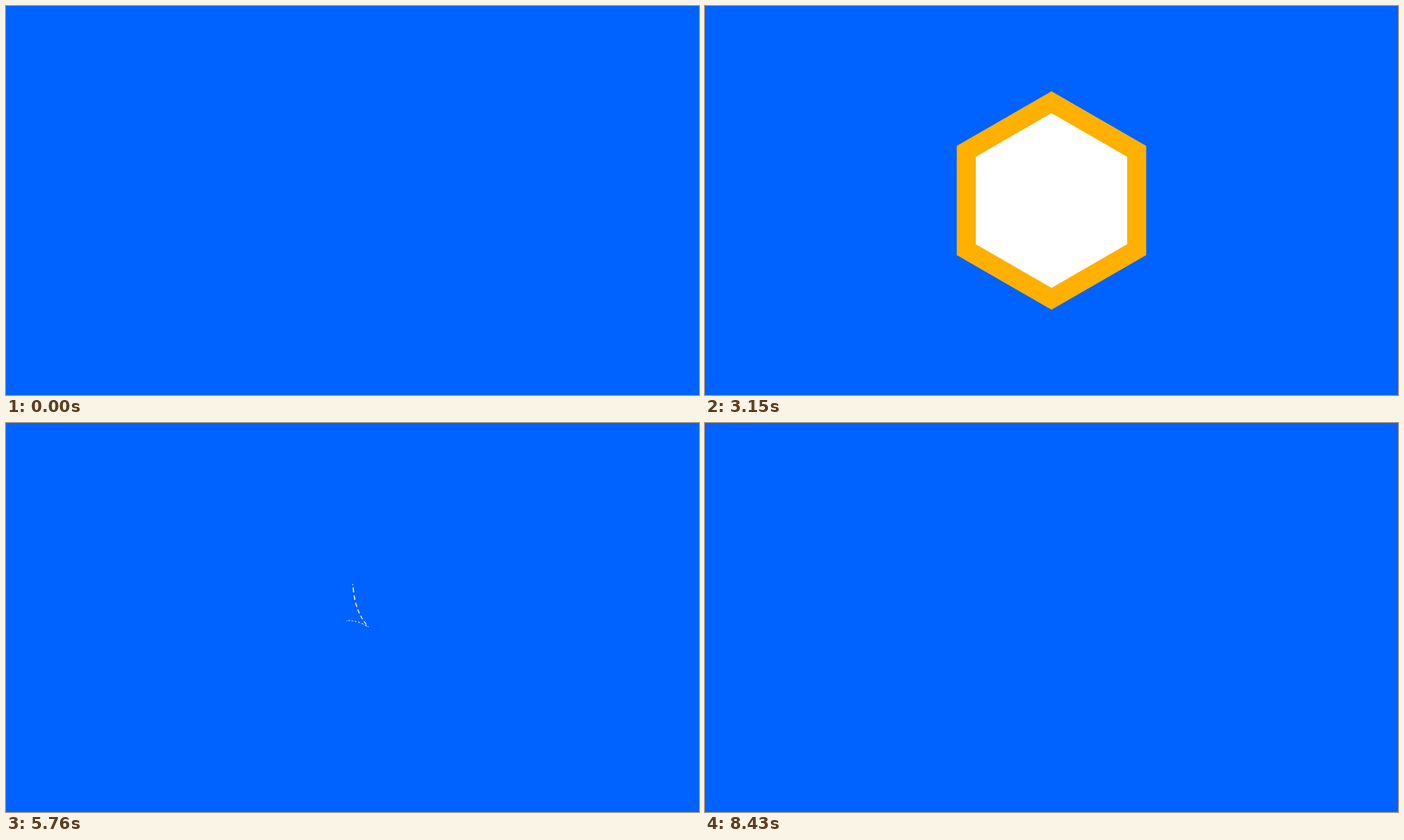
Recreate the animation shown at these times as an HTML page with a canvas. Size 998x561 px, loop 8.58 s.

```html
<!DOCTYPE html>
<html lang="en">
<head>
<meta charset="utf-8">
<title>Shapes in motion</title>
<style>
  html, body { margin: 0; width: 100%; height: 100%; overflow: hidden; background: #0062ff; }
  canvas { display: block; width: 998px; height: 561px; }
</style>
</head>
<body>
<canvas id="stage" width="998" height="561"></canvas>
<script>
const ctx = document.getElementById('stage').getContext('2d');
const W = 998, H = 561, CX = 499, CY = 280.5, R = 135.5;
const LOOP = 8580, STEP = 30, TAU = Math.PI * 2, DEG = Math.PI / 180;
const BLUE = '#0062ff', WHITE = '#fff', ORANGE = '#ffb000', YELLOW = '#eff84a', PINK = '#ff73fa';
const FULL = 2850, SPIRAL_START = 5250, END = 8430;

const clamp = (v, a = 0, b = 1) => Math.min(b, Math.max(a, v));
const progress = (t, start, length) => clamp((t - start) / length);
const easeOut = (p, power) => 1 - (1 - p) ** power;
const easeInOut = p => p < .5 ? 2 * p * p : 1 - 2 * (1 - p) ** 2;

function disc(r, color) {
  ctx.fillStyle = color;
  ctx.beginPath();
  ctx.arc(CX, CY, r, 0, TAU);
  ctx.fill();
}

// Liquid rising inside the circle
function level(t) {
  const s = (t - 1600) / 1250;
  return 279 - 80 * s - 25 * s ** 3 - 50 * Math.max(0, s) ** 8;
}

// Two swells: a slow one, then a shorter one as the surface nears the middle
function swell(t) {
  const bump = (start, length) => Math.sin(Math.PI * progress(t, start, length)) ** 2;
  return 12 + 38 * bump(60, 1750) + 50 * bump(1790, 620);
}

function drawLiquid(t) {
  const base = level(t), height = swell(t);
  const trough = 478 + .301 * (t - 1830);
  ctx.save();
  ctx.beginPath();
  ctx.moveTo(CX - 140, H);
  for (let x = CX - 140; x <= CX + 140; x += 2)
    ctx.lineTo(x, base + height * Math.cos(Math.PI * (x - trough) / 165));
  ctx.lineTo(CX + 140, H);
  ctx.clip();
  disc(R, WHITE);
  ctx.restore();
}

function hexagon(r) {
  for (let i = 0; i < 6; i++) {
    const a = i * TAU / 6 - TAU / 4;
    ctx[i ? 'lineTo' : 'moveTo'](CX + r * Math.cos(a), CY + r * Math.sin(a));
  }
  ctx.closePath();
}

const RINGS = [
  { color: ORANGE, start: 2880, length: 960, size: 414, power: 1.45, thick: .49 },
  { color: YELLOW, start: 3918, length: 450, size: 300, power: 2, thick: .62 },
  { color: PINK, start: 3951, length: 792, size: 261, power: 2, thick: .49 }
];
function drawRing(t, ring) {
  const p = progress(t, ring.start, ring.length);
  if (p <= 0 || p >= 1) return;
  const outer = ring.size * easeOut(p, ring.power);
  const inner = outer * (1 - ring.thick * (1 - p) ** 2.7);
  ctx.fillStyle = ring.color;
  ctx.beginPath();
  hexagon(outer);
  hexagon(inner);
  ctx.fill('evenodd');
}

function drawPie(t) {
  const sweep = easeInOut(progress(t, 3900, 1200)) * TAU;
  if (!sweep) return;
  const r = 136.5 * easeOut(progress(t, 3900, 222), 3);
  ctx.fillStyle = ORANGE;
  ctx.beginPath();
  ctx.moveTo(CX, CY);
  ctx.arc(CX, CY, r, -TAU / 4, sweep - TAU / 4);
  ctx.fill();
}

function drawCircleScene(t) {
  const scale = 1 - progress(t, 5100, 150) ** 2;
  ctx.save();
  ctx.translate(CX, CY);
  ctx.scale(scale, scale);
  ctx.translate(-CX, -CY);
  if (t < FULL) drawLiquid(t); else disc(R, WHITE);
  drawPie(t);
  ctx.restore();
  RINGS.forEach(ring => drawRing(t, ring));
}

// Dashed triangular spiral, inside to outside, a third of a turn per side
const PER_SIDE = 7, HALF_DASH = .305 / PER_SIDE;

function corner(k) {
  const r = 8.17 * (k + .2) ** 1.586;
  const twist = 33 / (1 + (k / 5) ** 8);
  const a = (238.3 + twist - 120 * k) * DEG;
  return [CX + r * Math.cos(a), CY + r * Math.sin(a)];
}

// Inner sides bend inwards, outer sides outwards
function spiral(u) {
  const k = Math.max(0, Math.floor(u)), s = u - k;
  const [ax, ay] = corner(k), [bx, by] = corner(k + 1);
  const dx = bx - ax, dy = by - ay;
  const bulge = Math.max(-.2, .045 * k - .35);
  const mx = ax + .42 * dx - bulge * dy;
  const my = ay + .42 * dy + bulge * dx;
  const mix = (a, m, b) => (1 - s) ** 2 * a + 2 * s * (1 - s) * m + s * s * b;
  return [mix(ax, mx, bx), mix(ay, my, by)];
}

function drawSpiral(t) {
  const head = (t - 5097) / 217;
  const tail = 8.95 * Math.max(0, (t - 5760) / 1860) ** 1.6;
  ctx.strokeStyle = WHITE;
  for (let j = Math.floor(tail * PER_SIDE); j <= head * PER_SIDE + 1; j++) {
    const u = j / PER_SIDE;
    const from = Math.max(u - HALF_DASH, tail), to = Math.min(u + HALF_DASH, head);
    if (to <= from) continue;
    ctx.lineWidth = .52 * u + .1;
    ctx.beginPath();
    ctx.moveTo(...spiral(from));
    ctx.lineTo(...spiral(to));
    ctx.stroke();
  }
}

function draw(t) {
  ctx.fillStyle = BLUE;
  ctx.fillRect(0, 0, W, H);
  if (t >= 60 && t < SPIRAL_START) drawCircleScene(t);
  else if (t >= SPIRAL_START && t < END) drawSpiral(t);
}

const begin = performance.now();
function tick() {
  const t = (performance.now() - begin) % LOOP;
  draw(Math.floor(t / STEP) * STEP);
  requestAnimationFrame(tick);
}
tick();
</script>
</body>
</html>
```
